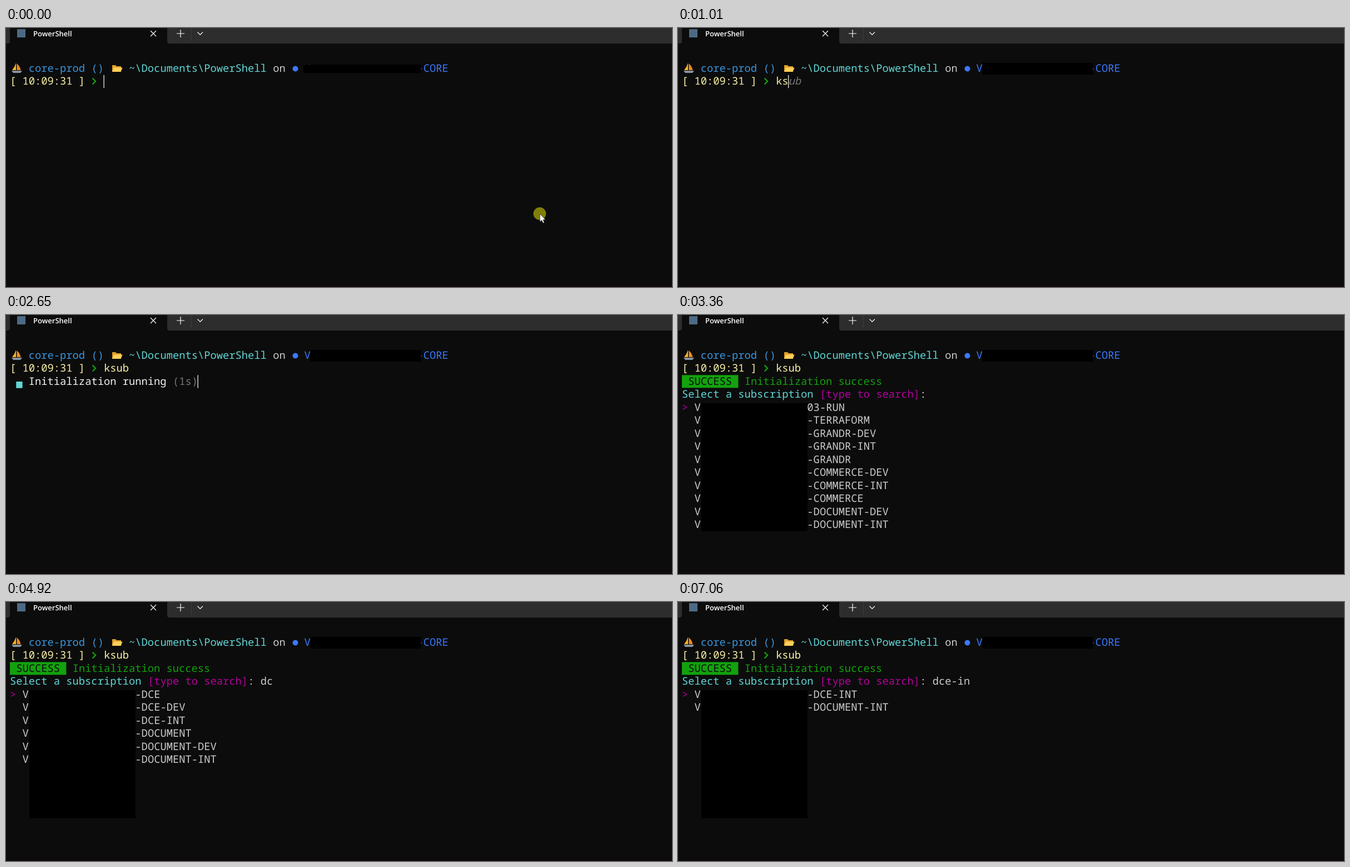
Animation of 1198 by 467 pixels, one loop 8000 ms. Source, as an HTML page:

```html
<!DOCTYPE html>
<html lang="en">
<head>
<meta charset="utf-8">
<title>Terminal</title>
<style>
  html, body { margin: 0; width: 100%; height: 100%; overflow: hidden; background: #0c0c0c; }
  svg { display: block; width: 100%; height: 100%; }
  text {
    font: 18.78px "Noto Sans Mono", monospace;
    font-variant-ligatures: none;
    text-rendering: geometricPrecision;
    white-space: pre;
  }
  .title { font: 600 13px "Open Sans", sans-serif; fill: #fff; }
  .hint { font-style: italic; }
  .line { fill: none; stroke: #fff; stroke-width: 1.2; }
</style>
</head>
<body>
<svg viewBox="0 0 1198 467">
  <rect width="1198" height="467" fill="#0c0c0c"/>
  <rect y="465.5" width="1198" height="1.5" fill="#12080b"/>

  <rect width="1198" height="28" fill="#2d2d2d"/>
  <path d="M3 28Q7 28 7 24V0H290V24Q290 28 294 28Z" fill="#0c0c0c"/>
  <rect x="20" y="2" width="15" height="15" fill="#4d6a85"/>
  <text class="title" x="49" y="15">PowerShell</text>
  <path class="line" d="M260 5L270 15M270 5L260 15M307 10H321M314 3V17M344.5 7.5L349.2 12.2L354 7.5"/>
  <path d="M333.5 0V23" stroke="#3b3b3b"/>

  <g id="sailboat">
    <path d="M18 63V76H11Q16 70 18 63Z" fill="#f7b52c"/>
    <path d="M19.5 64Q25 69 26.500 76H19.500Z" fill="#f08c1e"/>
    <path d="M10 77H29L26 81H13Z" fill="#8995a1"/>
  </g>
  <g id="folder">
    <path d="M191 79V67H197L199 69H207V79Z" fill="#e3a02b"/>
    <path d="M191 79L194 71.500H209.500L206.500 79Z" fill="#ffd05b"/>
  </g>
  <circle cx="520.500" cy="73.500" r="5" fill="#3b78ff"/>
  <path d="M155.500 90.500L161 96L155.500 101.500" fill="none" stroke="#13a10e" stroke-width="2.4"/>

  <g id="screen"></g>
  <rect id="headerMask"/>
  <rect id="listMask" x="42" y="159" width="191" height="231"/>
  <rect id="caret" width="1.2" height="23.5" fill="#fff"/>
  <circle id="halo" cx="960" cy="334.700" r="11.400" fill="#808008"/>
  <path id="pointer" d="M960.500 335.500V349.500L963.700 346.600L966 351.700L968.200 350.700L966 345.800H970.300Z" fill="#fff" stroke="#222" stroke-width=".6"/>
</svg>
<script>
const LOOP = 8000, LEFT = 7, CELL = 11.268, TOP = 61.3, ROW = 23.5;
const color = {
  yellow: '#f9f1a5', cyan: '#61d6d6', teal: '#3a96dd', blue: '#3b78ff', green: '#13a10e',
  magenta: '#b4009e', grey: '#767676', silver: '#cccccc', white: '#f2f2f2', black: '#0c0c0c'
};
const el = id => document.getElementById(id);
const colX = col => LEFT + col * CELL;
const rowY = row => TOP + row * ROW;

const ranked = '-DCE -DCE-DEV -DCE-INT -DOCUMENT -DOCUMENT-DEV -DOCUMENT-INT'.split(' ');
const everything = ('03-RUN -TERRAFORM -GRANDR-DEV -GRANDR-INT -GRANDR ' +
  '-COMMERCE-DEV -COMMERCE-INT -COMMERCE -DOCUMENT-DEV -DOCUMENT-INT').split(' ');
const firstHits = '-AD -DCE -GRANDR -MY-DEV -DCE-DEV -DCE-INT'.split(' ');
const moreHits = '-DOCUMENT -GRANDR-DEV -GRANDR-INT -COMMERCE-DEV'.split(' ');

// Each step overrides part of the state; spin counts quarter turns from the top left.
const steps = [
  [0, { typed: '', hint: '', caret: [15, 1], pointer: true, halo: true }],
  [150, { halo: false }],
  [370, { caret: null }],
  [870, { typed: 'k', caret: [16, 1], pointer: false }],
  [940, { hint: 'sub' }],
  [1010, { typed: 'ks', hint: 'ub', caret: [17, 1] }],
  [1160, { typed: 'ksu', hint: 'b', caret: [18, 1] }],
  [1230, { typed: 'ksub', hint: '', caret: [19, 1] }],
  [1370, { caret: [0, 2] }],
  [1440, { spin: 0, seconds: 0 }],
  [1510, { caret: [30, 2] }],
  [1660, { spin: 1 }],
  [1870, { spin: 2 }],
  [2010, { caret: null }],
  [2080, { spin: 3, seconds: 1 }],
  [2300, { spin: 0 }],
  [2430, { spin: 1 }],
  [2580, { caret: [30, 2] }],
  [2650, { spin: 2 }],
  [2860, { spin: 3 }],
  [3080, { spin: 0, caret: null }],
  [3290, { spin: 1 }],
  [3360, { spin: null, query: '', list: everything }],
  [4720, { query: 'd', list: firstHits }],
  [4790, { list: firstHits.concat(moreHits) }],
  [4920, { query: 'dc', list: ranked }],
  [5070, { query: 'dce' }],
  [5780, { query: 'dce-', list: ranked.filter(name => /-(DEV|INT)$/.test(name)) }],
  [6840, { query: 'dce-i', list: ranked.filter(name => name.endsWith('-INT')) }],
  [7060, { query: 'dce-in' }]
];

function add(tag, attributes, content = '') {
  const node = document.createElementNS('http://www.w3.org/2000/svg', tag);
  for (const key in attributes) node.setAttribute(key, attributes[key]);
  node.textContent = content;
  el('screen').append(node);
}

function write(col, row, content, fill, className = '') {
  add('text', { x: colX(col), y: rowY(row) + 17.6, fill, class: className }, content);
}

function block(col, top, width, height, fill) {
  add('rect', { x: colX(col), y: top, width: width * CELL, height, fill });
}

function drawPrompt(state) {
  write(3, 0, 'core-prod ()', color.teal);
  write(19, 0, '~\\Documents\\PowerShell', color.cyan);
  write(42, 0, 'on', color.silver);
  write(47, 0, 'V', color.blue);
  write(65, 0, '-CORE', color.blue);
  write(0, 1, '[ 10:09:31 ]', color.yellow);
  write(15, 1, state.typed, color.yellow);
  write(15 + state.typed.length, 1, state.hint, color.grey, 'hint');
}

function drawSpinner({ spin, seconds }) {
  const right = spin === 1 || spin === 2;
  block(right ? 1 : 0, rowY(2) + (spin > 1 ? ROW / 2 : 0), 1, ROW / 2, color.cyan);
  write(3, 2, 'Initialization running', color.white);
  write(26, 2, `(${seconds}s)`, color.grey);
}

function drawPicker({ query, list }) {
  block(0, rowY(2), 9, ROW - 0.5, color.green);
  write(1, 2, 'SUCCESS', color.black);
  write(10, 2, 'Initialization success', color.green);
  write(0, 3, 'Select a subscription', color.cyan);
  write(22, 3, '[type to search]', color.magenta);
  write(38, 3, ': ' + query, color.silver);
  write(0, 4, '>', color.magenta);
  list.forEach((name, i) => {
    write(2, 4 + i, 'V', color.silver);
    write(20, 4 + i, name, color.silver);
  });
}

function show(id, visible) {
  el(id).style.display = visible ? '' : 'none';
}

function place(id, x, y, width, height) {
  Object.entries({ x, y, width, height }).forEach(([key, value]) => el(id).setAttribute(key, value));
}

function render(state) {
  el('screen').replaceChildren();
  drawPrompt(state);
  if (state.list) drawPicker(state);
  else if (state.spin != null) drawSpinner(state);

  if (state.halo) place('headerMask', 535, 66, 211.5, 15);
  else place('headerMask', 547.5, 63, 199, 21);
  show('listMask', state.list);
  show('halo', state.halo);
  show('pointer', state.pointer);
  show('caret', state.caret);
  if (state.caret) place('caret', colX(state.caret[0]) - 0.5, rowY(state.caret[1]), 1.2, ROW);
}

const start = performance.now();
let shown = 0;

function tick(now) {
  const time = Math.max(0, now - start) % LOOP;
  const count = steps.filter(([at]) => at <= time).length;
  if (count !== shown) {
    shown = count;
    render(Object.assign({}, ...steps.slice(0, count).map(([, change]) => change)));
  }
  requestAnimationFrame(tick);
}
tick(start);
</script>
</body>
</html>
```
